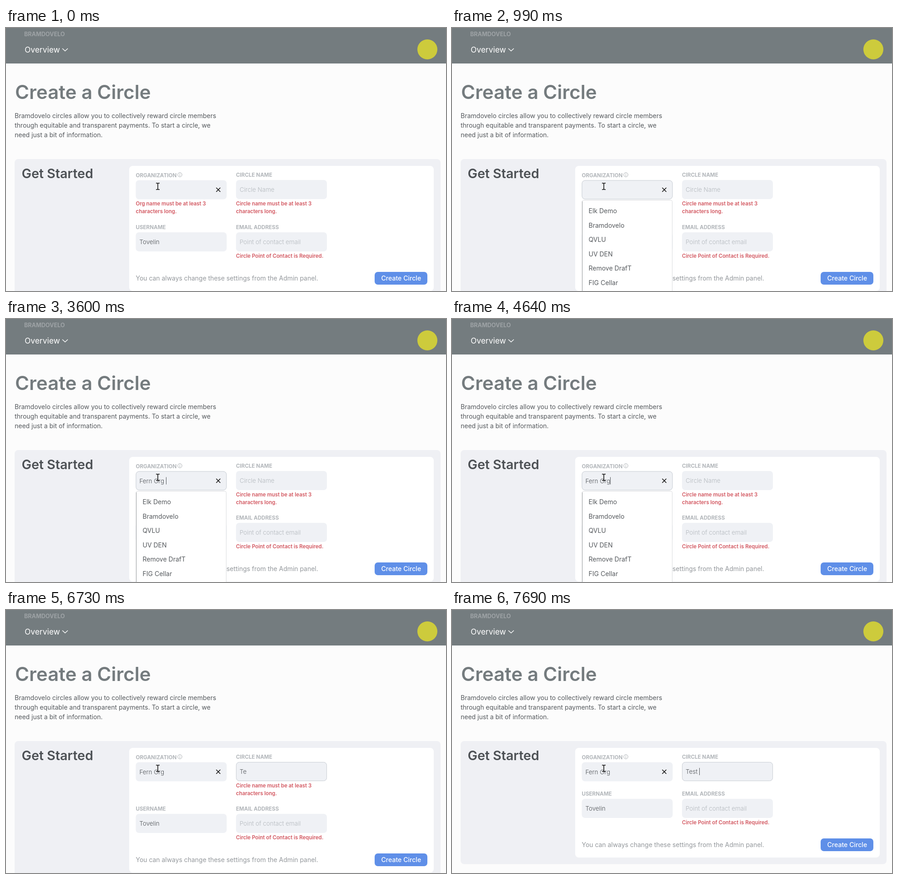
An HTML page with a canvas for the animation above (8 s loop, 968x578 px).

```html
<!DOCTYPE html>
<html lang="en">
<head>
<meta charset="utf-8">
<title>Create a Circle</title>
<style>
html, body { margin: 0; width: 100%; height: 100%; overflow: hidden; background: #fcfcfc; }
canvas { display: block; }
</style>
</head>
<body>
<canvas id="stage" width="968" height="578"></canvas>
<script>
const ctx = document.getElementById('stage').getContext('2d');
const LOOP = 8000;
const FONT = 'Inter, "Liberation Sans", sans-serif';

// weight, size, colour
const STYLES = {
  brand: [700, 12.6, '#9ea3a6'],
  nav: [400, 17.4, '#ffffff'],
  title: [600, 42, '#747b7e'],
  body: [400, 14, '#55595d'],
  heading: [600, 28.6, '#4d5155'],
  label: [700, 11.6, '#b2b6ba'],
  value: [300, 13.4, '#4d5155'],
  hint: [300, 13.4, '#b4b9be'],
  error: [600, 11.45, '#d2565f'],
  note: [400, 13.95, '#94989c'],
  button: [500, 14.1, '#ffffff']
};

const OPTIONS = ['Elk Demo', 'Bramdovelo', 'QVLU', 'UV DEN', 'Remove DrafT', 'FIG Cellar'];

// time, typed text, caret visible
const ORG = [
  [0, '', 0], [410, '', 1], [990, '', 0], [1490, '', 1], [1620, 'F', 1], [1790, 'Fe', 1],
  [1860, 'Fer', 1], [2240, 'Fern', 1], [2480, 'Fern ', 1], [2730, 'Fern O', 1],
  [2890, 'Fern Or', 1], [3110, 'Fern Org', 1], [3600, 'Fern Org ', 1], [3770, 'Fern Org', 1],
  [4150, 'Fern Org', 0], [4640, 'Fern Org', 1], [5110, 'Fern Org', 0]
];
const CIRCLE = [
  [0, '', 0], [5110, '', 1], [5600, '', 0], [5980, 'T', 1], [6200, 'Te', 1],
  [6730, 'Te', 0], [7080, 'Tes', 1], [7570, 'Test', 1], [7690, 'Test ', 1]
];
const MENU = [[0, 0], [410, 0.35], [480, 0.8], [540, 1], [5110, 0]];
const SHIFT = [[0, 0], [1860, -1], [7080, -34]];

const at = (keys, t) => keys.filter(k => k[0] <= t).pop();

function setFont(style) {
  const [weight, size, color] = STYLES[style];
  ctx.font = `${weight} ${size}px ${FONT}`;
  ctx.fillStyle = color;
}

function text(str, x, y, style) {
  setFont(style);
  ctx.fillText(str, x, y);
}

function box(x, y, w, h, r, fill, stroke) {
  ctx.beginPath();
  ctx.roundRect(x, y, w, h, r);
  ctx.fillStyle = fill;
  ctx.fill();
  if (!stroke) return;
  ctx.beginPath();
  ctx.roundRect(x + 0.5, y + 0.5, w - 1, h - 1, r);
  ctx.lineWidth = 1;
  ctx.strokeStyle = stroke;
  ctx.stroke();
}

function line(points, width, color) {
  ctx.beginPath();
  points.forEach(([x, y], i) => i ? ctx.lineTo(x, y) : ctx.moveTo(x, y));
  ctx.lineWidth = width;
  ctx.strokeStyle = color;
  ctx.stroke();
}

function disc(x, y, r, color) {
  ctx.beginPath();
  ctx.arc(x, y, r, 0, Math.PI * 2);
  ctx.fillStyle = color;
  ctx.fill();
}

function field(x, y, label, value, hint, focus, caret) {
  text(label, x, y - 7, 'label');
  box(x, y, 200, 42, 7, '#eff1f5', focus && '#c9ced4');
  const empty = value === '';
  text(empty ? hint : value, x + 8, y + 26, empty ? 'hint' : 'value');
  if (!caret) return;
  setFont('value');
  const cx = Math.round(x + 8 + ctx.measureText(value).width);
  ctx.fillRect(cx, y + 13, 1, 16);
}

function header() {
  ctx.fillStyle = '#747c7f';
  ctx.fillRect(0, 0, 968, 78);
  text('BRAMDOVELO', 40, 18, 'brand');
  text('Overview', 41, 54, 'nav');
  line([[124, 45], [130, 50.5], [136, 45]], 1.4, '#ffffff');
  disc(927, 47, 22, '#cdcb3c');
}

function intro() {
  text('Create a Circle', 20, 156, 'title');
  ['Bramdovelo circles allow you to collectively reward circle members',
   'through equitable and transparent payments. To start a circle, we',
   'need just a bit of information.'].forEach((s, i) => text(s, 19, 198 + i * 21, 'body'));
}

function infoIcon() {
  ctx.beginPath();
  ctx.arc(382.5, 322.5, 4.6, 0, Math.PI * 2);
  ctx.lineWidth = 1;
  ctx.strokeStyle = '#a4a9ad';
  ctx.stroke();
  line([[382.5, 322], [382.5, 325]], 1, '#a4a9ad');
  line([[382.5, 320], [382.5, 321]], 1, '#a4a9ad');
}

function menu(alpha) {
  if (!alpha) return;
  ctx.globalAlpha = alpha;
  box(286, 378, 199, 220, 3, '#ffffff', '#d9dbde');
  line([[286.5, 381], [286.5, 578]], 1, '#8e9296');
  OPTIONS.forEach((s, i) => text(s, 300.5, 407 + i * 31.5, 'body'));
  ctx.globalAlpha = 1;
}

function pointer() {
  line([[330, 341], [333, 341], [334, 342], [335, 341], [338, 341]], 1.4, '#111111');
  line([[330, 355], [333, 355], [334, 354], [335, 355], [338, 355]], 1.4, '#111111');
  line([[334, 342], [334, 354]], 1.6, '#111111');
}

function form(t) {
  const [, org, orgCaret] = at(ORG, t);
  const [, circle, circleCaret] = at(CIRCLE, t);
  const dy = at(SHIFT, t)[1];

  box(19, 288, 937, 304.5 + dy, 8, '#eff0f4');
  text('Get Started', 34.5, 330, 'heading');
  box(271, 303, 670, 275 + dy, 8, '#ffffff');

  field(285.5, 334.5, 'ORGANIZATION', org, '', t >= 410 && t < 5190, orgCaret);
  infoIcon();
  line([[462.5, 351], [471.5, 360]], 1.6, '#111111');
  line([[471.5, 351], [462.5, 360]], 1.6, '#111111');
  if (org.length < 3) {
    text('Org name must be at least 3', 285.5, 390, 'error');
    text('characters long.', 285.5, 407, 'error');
  }

  field(506, 334, 'CIRCLE NAME', circle, 'Circle Name', t >= 5190, circleCaret);
  if (circle.length < 3) {
    text('Circle name must be at least 3', 506, 389.5, 'error');
    text('characters long.', 506, 406.5, 'error');
  }

  field(285.5, 449 + dy, 'USERNAME', 'Tovelin', '');
  field(506, 449 + dy, 'EMAIL ADDRESS', '', 'Point of contact email');
  text('Circle Point of Contact is Required.', 506, 504.5 + dy, 'error');

  text('You can always change these settings from the Admin panel.', 285.5, 555 + dy, 'note');
  box(811, 536 + dy, 116, 28, 7, '#5f8fe8');
  text('Create Circle', 825.5, 555 + dy, 'button');

  menu(at(MENU, t)[1]);
  pointer();
}

function draw(now) {
  ctx.fillStyle = '#fcfcfc';
  ctx.fillRect(0, 0, 968, 578);
  header();
  intro();
  form(now % LOOP);
  requestAnimationFrame(draw);
}
requestAnimationFrame(draw);
</script>
</body>
</html>
```
